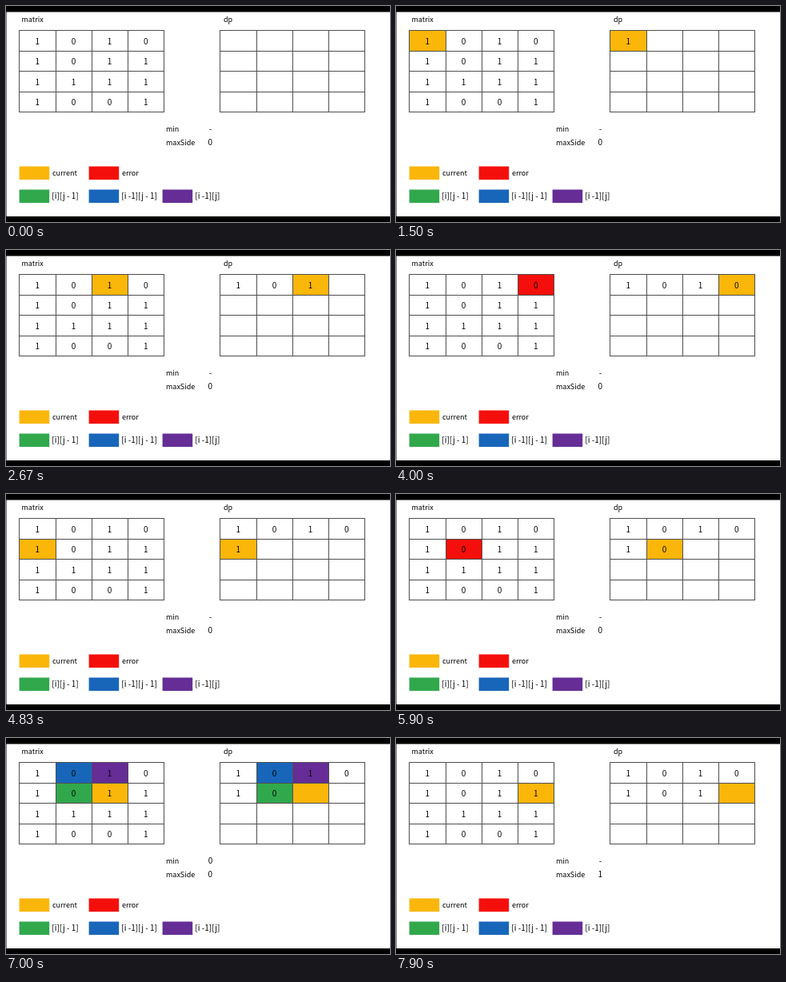
An HTML page with a canvas that plays this animation: 480 px wide and 270 px high, repeating every 8 s.

```html
<!DOCTYPE html>
<html lang="en">
<head>
<meta charset="utf-8">
<title>Largest square, step by step</title>
<style>
  html, body { margin: 0; width: 100%; height: 100%; overflow: hidden; background: #fff; }
  canvas { display: block; width: 100vw; height: 100vh; }
</style>
</head>
<body>
<canvas id="stage" width="480" height="270"></canvas>
<script>
const ctx = document.getElementById("stage").getContext("2d");
const LOOP = 8000;
const FIRST_CELL = 620;
const CELL_TIME = 900;
const FILL_DELAY = 225;
const COLORS = {
  current: "#fbb60a", error: "#f50f0c", left: "#31a84c", diagonal: "#1866b9", above: "#652d95"
};
const MATRIX = ["1010", "1011", "1111", "1001"];
const DP = "1010101";
// The first cell that looks at its three neighbours, and the one after it.
const LOOKUP = { start: 6020, neighbours: 6300, min: 6600, value: 7200, maxSide: 7400, next: 7750 };

function label(text, x, y, size = 9, align = "left") {
  ctx.font = `${size}px "Noto Sans CJK SC", "Noto Sans CJK JP", "Noto Sans", sans-serif`;
  ctx.textAlign = align;
  ctx.fillStyle = "#000";
  ctx.fillText(text, x, y);
}

function swatch(color, text, x, y, size) {
  ctx.fillStyle = color;
  ctx.fillRect(x - .4, y - .5, 37.6, 16.6);
  label(text, x + (size ? 40.3 : 41), y + 11, size);
}

function grid(left, values, fills) {
  const xAt = col => Math.round(left + col * 45.2);
  const yAt = row => Math.round(30 + row * 25.6);
  for (const [index, color] of Object.entries(fills)) {
    const col = index % 4, row = Math.floor(index / 4);
    ctx.fillStyle = color;
    ctx.fillRect(xAt(col), yAt(row), xAt(col + 1) - xAt(col), yAt(row + 1) - yAt(row));
  }
  ctx.beginPath();
  for (let i = 0; i <= 4; i++) {
    ctx.moveTo(xAt(i) + .5, 30);
    ctx.lineTo(xAt(i) + .5, yAt(4) + 1);
    ctx.moveTo(xAt(0), yAt(i) + .5);
    ctx.lineTo(xAt(4) + 1, yAt(i) + .5);
  }
  ctx.strokeStyle = "#505050";
  ctx.lineWidth = 1;
  ctx.stroke();
  [...values].forEach((digit, i) =>
    label(digit, left + 22.8 + i % 4 * 45.2, 47.5 + Math.floor(i / 4) * 25.6, 10, "center"));
}

function stateAt(time) {
  const state = { matrixFills: {}, dpFills: {}, filled: 0, min: "-", maxSide: "0" };
  if (time < FIRST_CELL) return state;

  if (time < LOOKUP.start) {
    const elapsed = time - FIRST_CELL;
    const cell = Math.floor(elapsed / CELL_TIME);
    const done = elapsed % CELL_TIME >= FILL_DELAY;
    state.filled = cell + done;
    state.matrixFills[cell] = done && DP[cell] === "0" ? COLORS.error : COLORS.current;
    state.dpFills[cell] = COLORS.current;
    return state;
  }

  const cell = time < LOOKUP.next ? 6 : 7;
  const fills = { [cell]: COLORS.current };
  if (cell === 6) {
    if (time >= LOOKUP.neighbours) {
      fills[cell - 1] = COLORS.left;
      fills[cell - 5] = COLORS.diagonal;
      fills[cell - 4] = COLORS.above;
    }
    if (time >= LOOKUP.min) state.min = "0";
  }
  state.matrixFills = state.dpFills = fills;
  state.filled = time >= LOOKUP.value ? 7 : 6;
  if (time >= LOOKUP.maxSide) state.maxSide = "1";
  return state;
}

function draw(now) {
  const state = stateAt(now % LOOP);
  ctx.fillStyle = "#000";
  ctx.fillRect(0, 0, 480, 270);
  ctx.fillStyle = "#fff";
  ctx.fillRect(.5, 7.5, 479.5, 255.5);

  label("matrix", 19.5, 20);
  label("dp", 272, 20);
  grid(16.4, MATRIX.join(""), state.matrixFills);
  grid(267.4, DP.slice(0, state.filled), state.dpFills);

  label("min", 200, 157);
  label(state.min, 255.5, 157, 10, "center");
  label("maxSide", 200, 174);
  label(state.maxSide, 255.2, 174, 10, "center");

  swatch(COLORS.current, "current", 17, 201);
  swatch(COLORS.error, "error", 104, 201);
  swatch(COLORS.left, "[i][j - 1]", 17, 230, 10);
  swatch(COLORS.diagonal, "[i -1][j - 1]", 104, 230, 10);
  swatch(COLORS.above, "[i -1][j]", 196, 230, 10);
  requestAnimationFrame(draw);
}
requestAnimationFrame(draw);
</script>
</body>
</html>
```
